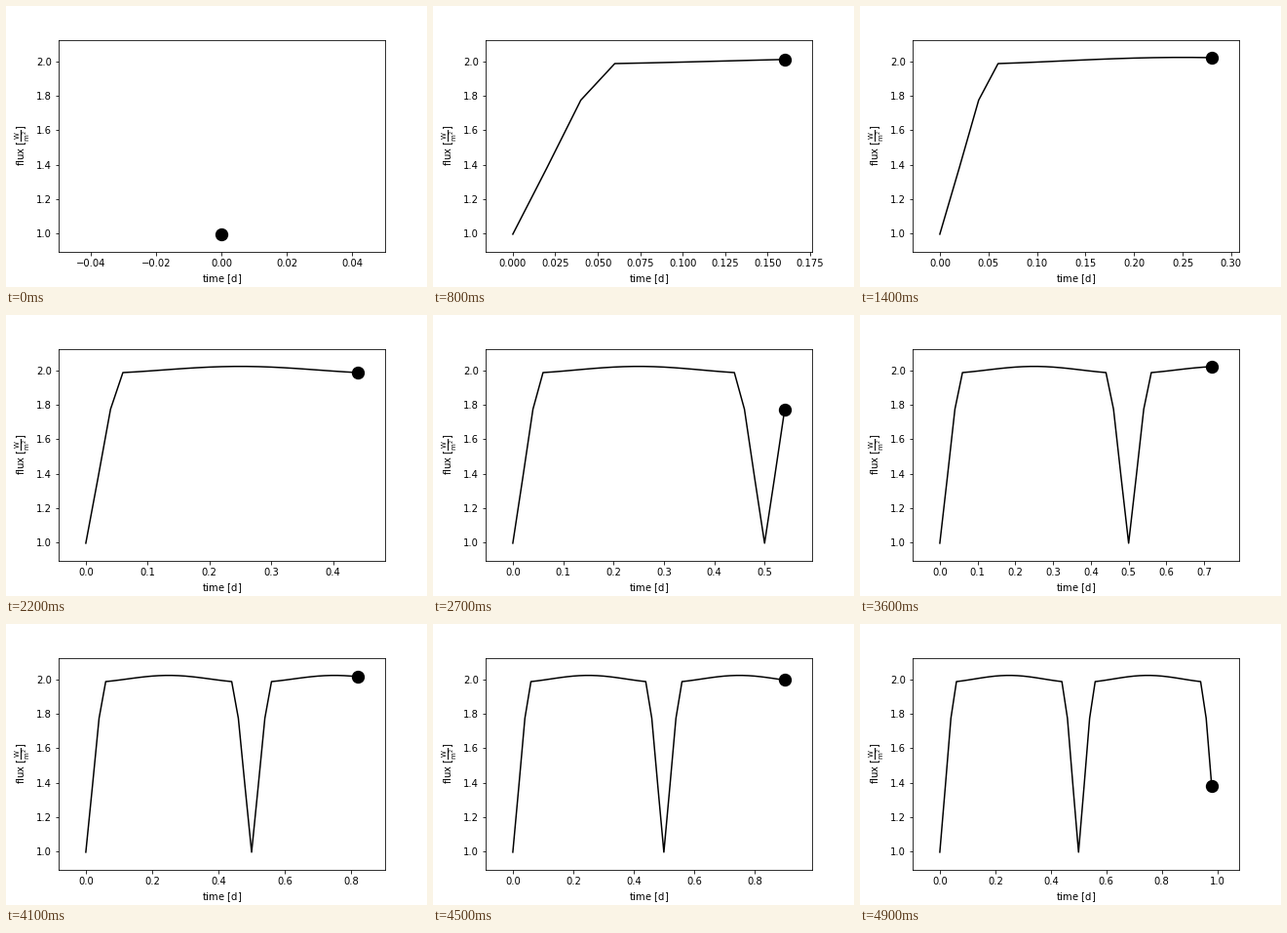
Recreate the animation shown at these times as a matplotlib script. Size 432 by 288 pixels, loop 5000 ms.

```python
import numpy as np
import matplotlib.pyplot as plt
from matplotlib.animation import FuncAnimation

plt.rcParams.update({"font.family": "DejaVu Sans", "font.size": 10})

FRAMES = 50
STEP = 0.02  # days per frame
HALF_PERIOD = 0.5
FLUX_MIN, FLUX_MAX = 0.995, 2.024
MARGIN = 0.1
MARKER_DIAMETER = 11.8


def light_curve(time):
    """Eclipses every half period on top of a gentle ellipsoidal variation."""
    phase = time % HALF_PERIOD
    distance = np.minimum(phase, HALF_PERIOD - phase)
    eclipse = np.interp(distance, [0, 0.02, 0.04, 0.06],
                        [FLUX_MIN, 1.38, 1.775, 1.988])
    plateau = FLUX_MAX - 0.0416 * np.cos(2 * np.pi * time) ** 2
    return np.where(distance < 0.059, eclipse, plateau)


times = np.round(np.arange(FRAMES) * STEP, 2)
fluxes = light_curve(times)

fig, ax = plt.subplots(figsize=(6, 4), dpi=72)
fig.subplots_adjust(left=0.125, right=0.9, bottom=0.125, top=0.88)
pad = MARGIN * (FLUX_MAX - FLUX_MIN)
ax.set_ylim(FLUX_MIN - pad, FLUX_MAX + pad)
ax.set_xlabel(r"time [$\mathrm{d}$]")
ax.set_ylabel(r"flux [$\mathrm{\frac{W}{m^{2}}}$]")

curve, = ax.plot([], [], color="black", lw=1.5)
marker = ax.scatter([0], [FLUX_MIN], s=MARKER_DIAMETER ** 2,
                    color="black", linewidths=1.5, zorder=3)


def update(frame):
    now = times[frame]
    curve.set_data(times[:frame + 1], fluxes[:frame + 1])
    curve.set_visible(frame > 0)
    marker.set_offsets([[now, fluxes[frame]]])
    if frame == 0:
        ax.set_xlim(-0.05, 0.05)
    else:
        ax.set_xlim(-MARGIN * now, (1 + MARGIN) * now)
    return curve, marker


anim = FuncAnimation(fig, update, frames=FRAMES, init_func=lambda: update(0),
                     interval=100, repeat=True, repeat_delay=0, blit=False)
plt.show()
```
